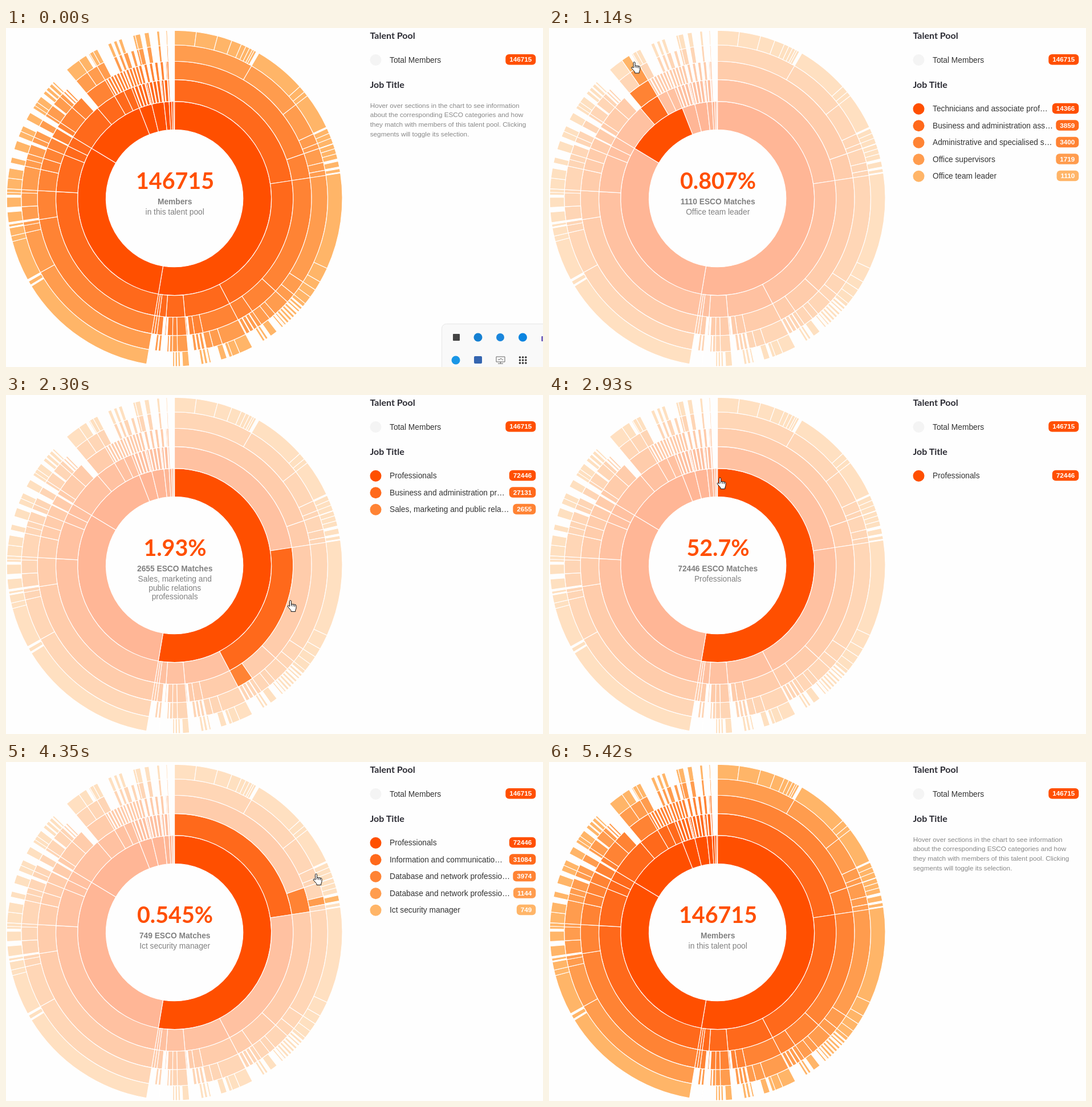
An HTML page with a canvas that plays this animation: 942x594 px, repeating every 5660 ms.

```html
<!DOCTYPE html>
<html lang="en">
<head>
<meta charset="utf-8">
<title>Talent pool sunburst</title>
<style>
html, body { margin: 0; width: 100%; height: 100%; overflow: hidden; background: #fefefe; }
canvas, svg { position: absolute; left: 0; top: 0; width: 942px; height: 594px; }
text { font: 13.75px "Liberation Sans", Arial, sans-serif; fill: #333; }
.head { font: 700 16px Lato, sans-serif; fill: #2b2b33; }
.big { font: 700 39.4px Lato, sans-serif; fill: #ff4f00; text-anchor: middle; }
.mid { fill: #808080; text-anchor: middle; }
.bold { font-weight: 700; }
.hint { font-size: 11.75px; fill: #888; }
.badge { font-size: 11.7px; font-weight: 700; fill: #fff; text-anchor: middle; }
</style>
</head>
<body>
<canvas id="chart" width="942" height="594"></canvas>
<svg id="ui" viewBox="0 0 942 594"></svg>
<script>
const LOOP = 5660, CX = 295.6, CY = 298.6, R = 120.2;
const TOTAL = 137540, DEG = 360 / TOTAL;
const COLORS = ['#ff4f00', '#ff691b', '#ff8334', '#ff9c4e', '#ffb568'];
const SANS = '"Liberation Sans", Arial, sans-serif';

// Cell borders in degrees, by the ring where they start; outer rings inherit them.
const CUTS = [
  [0, 189.6, 301.1, 338.7, 346.4, 353.7, 356.8, 358.3, 359.4, 360],
  [81.35, 152.35, 174.9, 184.1, 187.4, 188.5, 273.3, 291.6, 296.2, 319.5, 329.6, 334.7],
  [70.95, 132.5, 145.4, 168, 171.6, 178.9, 180.8, 261.1, 282.2, 287, 303.6, 311.6],
  [30.2, 52.35, 65.1, 69, 76.4, 79.4, 123, 128.8, 138.9, 141.6, 161.8, 165.4, 241.1, 257, 259.8,
    266.9, 272.1, 284.8, 293.6, 325.3],
  [7.5, 14.9, 20, 23.5, 25.2, 26.6, 27.7, 28.4, 48.3, 50.7, 67.2, 71.1, 72.8, 74.6, 114.6, 119.8,
    126, 157.1, 159.8, 255.1, 277, 305, 331],
];

// Empty spans as pairs, inherited the same way.
const GAPS = [
  [],
  [357.5, 360],
  [173.7, 174.4, 183, 183.6, 184.4, 185.2, 296.2, 296.6, 300.7, 301.4, 317.2, 320],
  [168, 168.6, 173.3, 174.9, 182.8, 184.8, 186.1, 186.5, 187.4, 189.6, 261.1, 261.7, 290.6, 291.6,
    296.6, 298, 300.7, 302.5, 307.3, 307.9, 316, 319.4, 332.6, 336.6, 337.8, 338.6, 339.8, 340.5,
    342.2, 343.4, 344.6, 345.6, 348.2, 349.6, 351.2, 353.9, 354.8, 357.1],
  [29.2, 30.2, 64.9, 65.4, 76.4, 77.2, 79.16, 79.8, 81, 81.35, 140.2, 142.4, 145, 146.2, 148.2, 152.35,
    160.9, 161.8, 163.9, 167.4, 171.1, 174.4, 177.2, 178, 180.6, 184.8, 185.4, 189.6, 238.5, 239,
    240.4, 241.1, 259.8, 260.2, 265.3, 266.9, 270.4, 271.2, 280.4, 282.2, 284.2, 287, 290.1, 290.6,
    295.6, 296.6, 307.3, 308.6, 314, 316, 328.2, 329.2, 341.7, 345],
];

// Rows of slivers in one ring: [ring, from, to, bar, space]
const COMBS = [
  [1, 338.4, 357.5, 1.5, 0.35], [2, 329.4, 344.8, 1.1, 0.3], [2, 344.8, 357.5, 1.2, 1.1],
  [3, 145.6, 152.3, 1.4, 0.25], [3, 168.6, 173.3, 1.1, 0.4], [3, 181.2, 182.8, 0.65, 0.3],
  [3, 312.4, 316, 0.7, 0.5], [4, 129.2, 140.2, 0.85, 0.45], [4, 146.2, 148.2, 0.8, 0.4],
  [4, 168.6, 171.1, 0.9, 0.4], [4, 178, 180.6, 0.7, 0.3], [4, 308.6, 314, 1.2, 0.4],
];

// key: [title, members, start angle]
const NODES = {
  pro: ['Professionals', 72446, 0],
  ict: ['Information and communications technology professionals', 31084, 0],
  dev: ['Software and applications developers and analysts', 27110, 0],
  web: ['Software developers', 11538, 0],
  arch: ['Ict system architect', 1948, 14.9],
  sys: ['Systems analysts', 8462, 30.2],
  ana: ['Ict system analyst', 6915, 30.2],
  app: ['Software and applications developers not elsewhere classified', 4907, 52.35],
  test: ['Software tester', 4792, 52.35],
  db: ['Database and network professionals', 3974, 70.95],
  net: ['Database and network professionals not elsewhere classified', 1144, 76.4],
  sec: ['Ict security manager', 749, 77.2],
  biz: ['Business and administration professionals', 27131, 81.35],
  adm: ['Administration professionals', 19544, 81.35],
  org: ['Management and organisation analysts', 15914, 81.35],
  cons: ['Business consultant', 12705, 81.35],
  fin: ['Finance professionals', 4929, 132.5],
  sale: ['Sales, marketing and public relations professionals', 2655, 145.4],
  mgr: ['Managers', 42622, 189.6],
  com: ['Administrative and commercial managers', 31996, 189.6],
  serv: ['Business services and administration managers', 27319, 189.6],
  oth: ['Business services and administration managers not elsewhere classified', 19686, 189.6],
  proj: ['Project manager', 18573, 189.6],
  tech: ['Technicians and associate professionals', 14366, 301.1],
  bat: ['Business and administration associate professionals', 3859, 319.5],
  sec2: ['Administrative and specialised secretaries', 3400, 320],
  off: ['Office supervisors', 1719, 325.3],
  lead: ['Office team leader', 1110, 325.3],
};

// [time, hovered path]
const HOVERS = [
  [0, ''], [230, 'pro biz adm org cons'], [470, 'pro ict db net sec'], [550, 'pro ict dev app test'],
  [760, 'pro ict dev sys ana'], [900, 'pro ict dev web arch'], [1050, 'tech bat sec2 off lead'],
  [1290, 'tech bat'], [1370, 'tech'], [1450, 'mgr'], [1630, 'mgr com'], [1800, 'mgr com serv oth'],
  [1890, ''], [2200, 'pro biz sale'], [2360, 'pro biz adm'], [2520, 'pro ict'], [2600, 'pro ict dev'],
  [2920, 'pro'], [3000, 'tech'], [3080, 'mgr com'], [3160, 'mgr com serv'],
  [3240, 'mgr com serv oth'], [3490, 'mgr com serv oth proj'], [3640, 'mgr com serv'],
  [3800, 'mgr'], [3880, 'pro'], [3960, 'pro biz'], [4120, 'pro biz fin'],
  [4270, 'pro ict db'], [4350, 'pro ict db net sec'], [4500, 'pro ict dev app test'],
  [4580, 'pro ict dev web arch'], [4740, 'pro ict dev'], [4830, 'pro'], [4910, 'tech'], [5000, 'mgr'],
  [5140, 'mgr com serv'], [5210, 'mgr com serv oth proj'], [5420, ''],
];

// Pointer tip: [time, x, y]
const POINTER = [
  [70, 567, 362], [470, 574, 238], [690, 551, 161], [980, 385, 35], [1130, 145, 60], [1460, 165, 235],
  [1630, 96, 418], [1890, 20, 505], [1990, 200, 640], [2130, 402, 575], [2300, 499, 360], [2600, 450, 140],
  [2920, 300, 145], [3080, 90, 290], [3490, 168, 549], [3800, 255, 430], [4120, 420, 462], [4270, 568, 240],
  [4350, 544, 196], [4590, 380, 40], [4840, 310, 145], [5000, 165, 225], [5280, 18, 500],
];

// Bursts of picture updates: [first, last, count]
const BURSTS = [
  [0], [70], [230, 550, 5], [690, 1200, 8], [1290, 1630, 5], [1800, 1990, 3], [2130, 2300, 3],
  [2360, 2600, 4], [2760, 3320, 8], [3490], [3640, 3960, 5], [4120, 4350, 4], [4500, 5000, 7],
  [5140, 5280, 3], [5420],
];

const HAND = 'M-1.5 1.5Q-1.5 0 0 0T1.5 1.5V7Q3 5.6 4.6 7Q6 5.9 7.4 7.4Q9.5 6.6 10 9V13Q10 15 8.7 17V19.5H1V17.5' +
  'L-4.6 11Q-5.4 9 -3.4 8.8L-1.5 10.5ZM1.5 7V10M4.6 7V10.5M7.4 7.4V11';
const ARROW = 'M0 0V16L3.7 12.5L6 18L8.5 17L6.2 11.7H11Z';

const ctx = document.getElementById('chart').getContext('2d');
const ui = document.getElementById('ui');
const ruler = document.createElement('canvas').getContext('2d');

const last = (list, t) => list.filter(e => e[0] <= t).pop();
const text = (x, y, s, cls = '') => `<text x="${x}" y="${y}" class="${cls}">${s}</text>`;
const rect = (x, y, w, h, r, fill, more = '') =>
  `<rect x="${x}" y="${y}" width="${w}" height="${h}" rx="${r}" fill="${fill}" ${more}/>`;
const dot = (x, y, r, fill) => `<circle cx="${x}" cy="${y}" r="${r}" fill="${fill}"/>`;

function width(s, font) {
  ruler.font = font + ' ' + SANS;
  return ruler.measureText(s).width;
}

function cellsOf(ring) {
  const upTo = lists => lists.slice(0, ring + 1).flat();
  const gaps = upTo(GAPS), cuts = [...upTo(CUTS), ...gaps], holes = [];
  for (let i = 0; i < gaps.length; i += 2) holes.push([gaps[i], gaps[i + 1]]);
  for (const [r, from, to, bar, space] of COMBS) {
    if (r !== ring) continue;
    for (let a = from + bar; a < to; a += bar + space) {
      const b = Math.min(a + space, to);
      holes.push([a, b]);
      cuts.push(a, b);
    }
  }
  cuts.sort((a, b) => a - b);
  return cuts.slice(1).map((b, i) => [cuts[i], b]).filter(([a, b]) => {
    const m = (a + b) / 2;
    return b - a > 0.1 && !holes.some(h => m > h[0] && m < h[1]);
  });
}
const CELLS = COLORS.map((c, ring) => cellsOf(ring));

function stepTime(t) {
  const [a, b, n] = last(BURSTS, t);
  if (!n) return a;
  const gap = (b - a) / (n - 1);
  return a + gap * Math.min(n - 1, Math.floor((t - a) / gap + 1e-6));
}

function pointerAt(t) {
  const i = POINTER.findIndex(p => p[0] > t);
  if (i < 0) return POINTER[POINTER.length - 1].slice(1);
  const [t0, x0, y0] = POINTER[i - 1], [t1, x1, y1] = POINTER[i];
  const k = (t - t0) / (t1 - t0);
  return [x0 + (x1 - x0) * k, y0 + (y1 - y0) * k];
}

function drawCell(ring, a, b, alpha) {
  const rad = d => (d - 90) * Math.PI / 180;
  ctx.beginPath();
  ctx.arc(CX, CY, R * Math.sqrt(ring + 1), rad(a), rad(b));
  ctx.arc(CX, CY, R * Math.sqrt(ring + 2), rad(b), rad(a), true);
  ctx.closePath();
  ctx.globalAlpha = alpha;
  ctx.fillStyle = COLORS[ring];
  ctx.fill();
  ctx.globalAlpha = 1;
  ctx.stroke();
}

function drawChart(path) {
  ctx.fillStyle = '#fefefe';
  ctx.fillRect(0, 0, 942, 594);
  ctx.strokeStyle = '#fff';
  ctx.lineWidth = 1.1;
  CELLS.forEach((cells, ring) => {
    const node = path[ring];
    for (const [a, b] of cells) {
      const m = (a + b) / 2;
      const lit = !path.length || (node && m > node[2] && m < node[2] + node[1] * DEG);
      drawCell(ring, a, b, lit ? 1 : 0.41);
    }
  });
}

function row(y, name, count, dotColor, color) {
  const w = width(count, 'bold 11.7px') + 14, x = 929.3 - w;
  const room = x - 673 - 4.5;
  let label = name;
  for (let n = name.length; width(label, '13.75px') > room; n--) label = name.slice(0, n) + '…';
  return dot(648.5, y + 0.5, 10, dotColor) + text(673, y + 5, label) +
    rect(x, y - 9.5, w, 18.5, 6, color) + text(x + w / 2, y + 3.9, count, 'badge');
}

function wrap(s) {
  const lines = [''];
  for (const word of s.split(' ')) {
    const next = (lines[lines.length - 1] + ' ' + word).trim();
    if (width(next, '13.75px') <= 150) lines[lines.length - 1] = next;
    else lines.push(word);
  }
  return lines;
}

function tray() {
  let s = rect(764.5, 518.5, 200, 100, 8, '#f9f9f9', 'stroke="#e6e6e6"');
  s += rect(784, 536, 12, 12, 1, '#444') + dot(828, 542, 7.5, '#1580d2');
  s += dot(867, 542, 7, '#1a86dc') + dot(906.5, 542, 7.5, '#0a84e0') + rect(939, 540, 5, 9, 1, '#7a6cc0');
  s += dot(789, 582, 7.5, '#1996e6') + rect(821, 575, 14, 13, 2, '#3465b0');
  s += '<path d="M860 576H875V585H860ZM867.5 585V588M863 588H872M863 581H866L868 579L872 582" fill="none" stroke="#666"/>';
  for (let i = 0; i < 9; i++) s += dot(901.5 + i % 3 * 5.2, 577 + Math.floor(i / 3) * 5, 1.8, '#333');
  return s;
}

function pointer(t) {
  const [x, y] = pointerAt(t);
  const shape = Math.hypot(x - CX, y - CY) < 294 ? HAND : ARROW;
  return `<path transform="translate(${x} ${y})" d="${shape}" fill="#fff" stroke="#111" stroke-linejoin="round"/>`;
}

function drawUi(t, path) {
  let s = text(638.5, 18.5, 'Talent Pool', 'head') + text(638.5, 105, 'Job Title', 'head');
  s += row(55.5, 'Total Members', '146715', '#f4f4f4', COLORS[0]);
  const node = path[path.length - 1];
  if (node) {
    s += text(296.5, 281.5, (node[1] / TOTAL * 100).toPrecision(3) + '%', 'big');
    s += text(296.2, 308.7, node[1] + ' ESCO Matches', 'mid bold');
    wrap(node[0]).forEach((line, i) => s += text(296.2, 326.8 + i * 15.8, line, 'mid'));
    path.forEach((n, i) => s += row(141.3 + i * 29.5, n[0], String(n[1]), COLORS[i], COLORS[i]));
  } else {
    s += text(296.5, 281.5, '146715', 'big') + text(296.2, 308.7, 'Members', 'mid bold');
    s += text(296.2, 326.8, 'in this talent pool', 'mid');
    ['Hover over sections in the chart to see information',
      'about the corresponding ESCO categories and how',
      'they match with members of this talent pool. Clicking',
      'segments will toggle its selection.'
    ].forEach((line, i) => s += text(638.7, 139.7 + i * 16.6, line, 'hint'));
  }
  if (t < 70) s += tray();
  else if (t < 5420) s += pointer(t);
  ui.innerHTML = s;
}

const start = performance.now();
let shown = -1, shownKeys = null;

function frame() {
  const t = stepTime((performance.now() - start) % LOOP);
  if (t !== shown) {
    const keys = last(HOVERS, t + 0.5)[1];
    const path = keys ? keys.split(' ').map(k => NODES[k]) : [];
    if (keys !== shownKeys) drawChart(path);
    drawUi(t, path);
    shown = t;
    shownKeys = keys;
  }
  requestAnimationFrame(frame);
}
frame();
</script>
</body>
</html>
```
